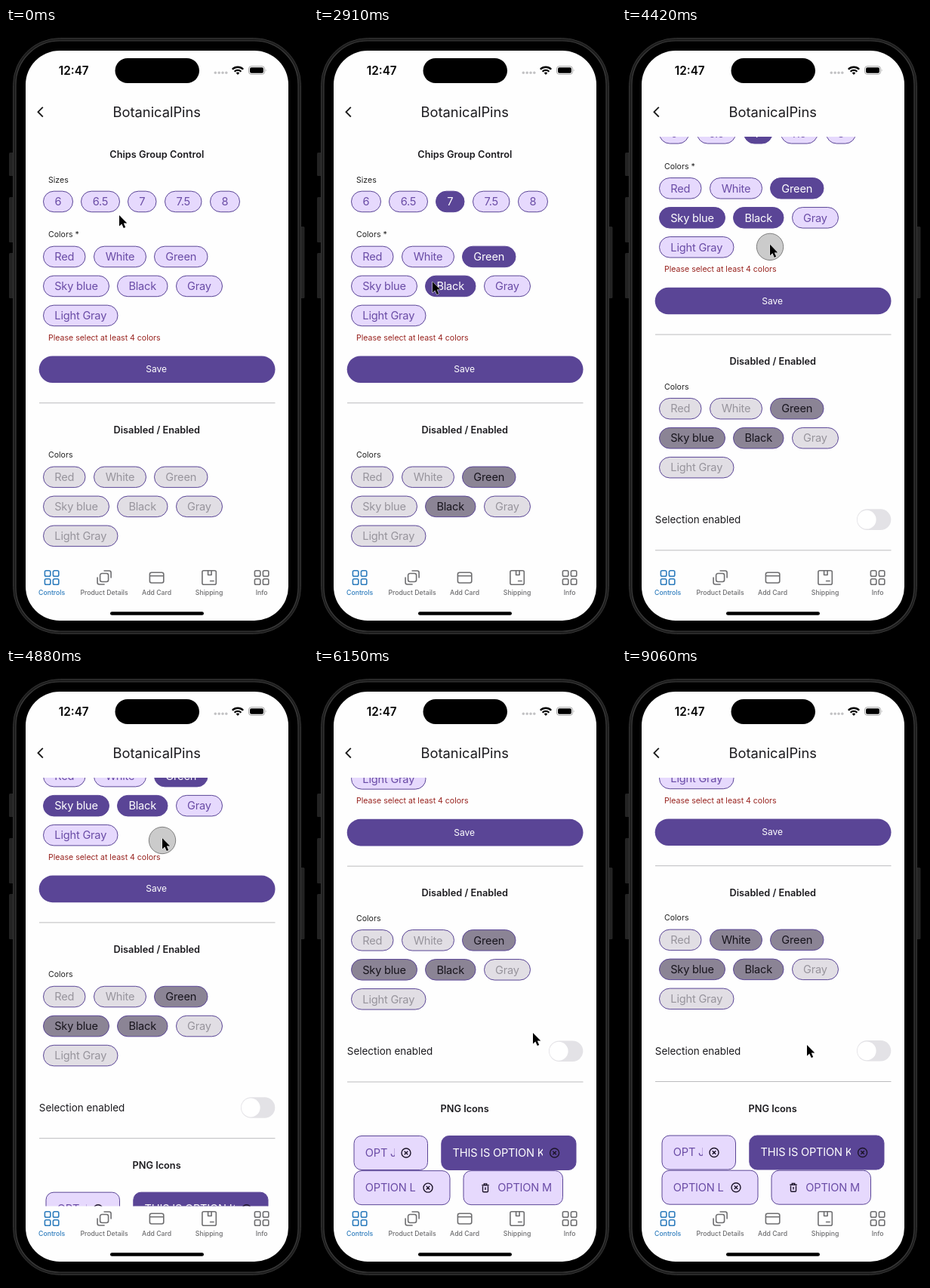
Write an HTML page that moves like this. It is 400x812 px and loops after 9.09 s.

```html
<!DOCTYPE html>
<html lang="en">
<head>
<meta charset="utf-8">
<title>Chips demo</title>
<style>
  html, body { margin: 0; width: 100%; height: 100%; overflow: hidden; background: #000; }
  svg { display: block; width: 400px; height: 812px; font-family: Inter, "Open Sans", sans-serif; }
  .mid { text-anchor: middle; }
  .chip { font-size: 14.6px; letter-spacing: -.2px; }
  .head { font-size: 12.75px; font-weight: 600; fill: #1c1b1f; }
  .small { font-size: 10.55px; fill: #222; }
  .tab { fill: none; stroke-width: 1.6; stroke-linecap: round; stroke-linejoin: round; }
  .tabname { font-size: 8.7px; font-weight: 500; }
</style>
</head>
<body>
<svg id="stage" viewBox="0 0 400 812" xmlns="http://www.w3.org/2000/svg">
  <defs>
    <clipPath id="view"><rect x="26" y="144" width="348" height="567.5"/></clipPath>
    <clipPath id="cutJ"><rect x="60" y="854" width="47" height="45"/></clipPath>
    <clipPath id="cutK"><rect x="175" y="854" width="128" height="45"/></clipPath>
  </defs>

  <!-- Phone body -->
  <rect width="400" height="812"/>
  <g fill="#232323">
    <rect x="4" y="165" width="7" height="31" rx="1.5"/>
    <rect x="4" y="224" width="7" height="60" rx="1.5"/>
    <rect x="4" y="298" width="7" height="60" rx="1.5"/>
    <rect x="389" y="263" width="6.5" height="95" rx="1.5"/>
  </g>
  <rect x="9.5" y="13.5" width="381" height="789" rx="62" fill="#1d1d1d" stroke="#353535"/>
  <rect x="13" y="17" width="374" height="782" rx="58" stroke="#3b3b3b" stroke-width="1.2"/>
  <rect x="26" y="30" width="348" height="755" rx="45" fill="#fefefe"/>
  <rect x="144.500" y="40" width="111.500" height="33" rx="16.500"/>

  <!-- Status bar -->
  <text x="89.700" y="61.700" class="mid" font-size="15.300" font-weight="600">12:47</text>
  <g fill="#c2c2c4">
    <circle cx="277.300" cy="59.300" r="1.700"/><circle cx="282.200" cy="59.300" r="1.700"/>
    <circle cx="287" cy="59.300" r="1.700"/><circle cx="291.800" cy="59.300" r="1.700"/>
  </g>
  <g fill="none" stroke="#000" stroke-width="2.300">
    <path d="M299.800 54.700a10.300 10.300 0 0 1 14.400 0"/>
    <path d="M302.600 57.700a6.300 6.300 0 0 1 8.800 0"/>
  </g>
  <path d="M304.700 59.500a3.300 3.300 0 0 1 4.600 0L307 62z"/>
  <rect x="321.500" y="50.700" width="21" height="10.600" rx="3.300" fill="none" stroke="#a5a5a5"/>
  <rect x="323" y="52.200" width="18" height="7.600" rx="2"/>
  <path d="M343.800 54.300q1.600 1.700 0 3.400z" fill="#a5a5a5"/>

  <!-- Title bar -->
  <path d="M48.800 104.800L42.500 111.200l6.300 6.400" fill="none" stroke="#1b1b1b" stroke-width="1.900"/>
  <text x="199.800" y="117.800" class="mid" font-size="18.300" fill="#1c1b1f">BotanicalPins</text>

  <g clip-path="url(#view)"><g id="page"></g></g>
  <g id="tabs"></g>
  <rect x="138" y="773.300" width="124" height="4.400" rx="2.200"/>

  <circle id="touch" r="17.700" fill="#999" fill-opacity=".5" stroke="#666" stroke-opacity=".8"/>
  <path id="cursor" d="M0 0v14.600l3.300-3.100 2.500 5.600 2.400-1.100-2.400-5.400h4.500z" stroke="#fff" stroke-width="1" paint-order="stroke" stroke-linejoin="round"/>
</svg>

<script>
const LOOP = 9090;
const PURPLE = '#5a4596', LILAC = '#e6d9fd', INK = '#6a4ca6';
const $ = id => document.getElementById(id);
const page = $('page');

function add(parent, tag, attrs, text) {
  const el = document.createElementNS('http://www.w3.org/2000/svg', tag);
  for (const k in attrs) el.setAttribute(k, attrs[k]);
  if (text) el.textContent = text;
  parent.append(el);
  return el;
}

const label = (cls, x, y, text, extra) => add(page, 'text', { class: cls, x, y, ...extra }, text);
const rule = y => add(page, 'path', { d: `M44 ${y}H356.500`, stroke: '#bcbcbe' });

function chip(name, x, y, right) {
  const box = add(page, 'rect', { x: x + .5, y: y + .5, width: right - x - 1, height: 27.5, rx: 13.75, stroke: PURPLE });
  const text = label('chip mid', (x + right) / 2, y + 19.5, name);
  return { name, box, text };
}

function paint({ box, text }, on, enabled = true) {
  const [fill, ink] = enabled
    ? (on ? [PURPLE, '#fff'] : [LILAC, INK])
    : (on ? ['#8b8495', '#17141c'] : ['#e1dee4', '#97949c']);
  box.setAttribute('fill', fill);
  text.setAttribute('fill', ink);
}

const colorChips = y => [
  chip('Red', 49, y, 105.5), chip('White', 116, y, 186), chip('Green', 196, y, 267.5),
  chip('Sky blue', 49, y + 39, 137), chip('Black', 147, y + 39, 214.5), chip('Gray', 225, y + 39, 287),
  chip('Light Gray', 49, y + 78, 148.5)
];

// Chips group
label('head mid', 199.8, 172.3, 'Chips Group Control');
label('small', 56, 204.5, 'Sizes');
const sizes = [['6', 49, 89], ['6.5', 99, 151], ['7', 161, 199.5], ['7.5', 210, 259.5], ['8', 270, 310]]
  .map(([name, x, right]) => chip(name, x, 215.7, right));
label('small', 56, 277.2, 'Colors *');
const colors = colorChips(288.7);
label('small', 56, 414, 'Please select at least 4 colors', { style: 'fill:#98231f' });
add(page, 'rect', { x: 43.7, y: 434.4, width: 312.8, height: 35.6, rx: 17.8, fill: PURPLE });
label('mid', 199.2, 456.3, 'Save', { 'font-size': 12, fill: '#fff' });
rule(496.7);

// Disabled / enabled group
label('head mid', 199.8, 537, 'Disabled / Enabled');
label('small', 56, 569.3, 'Colors');
const mirror = colorChips(580.6);
label('', 43.8, 746.8, 'Selection enabled', { 'font-size': 13.45, fill: '#1c1b1f' });
const track = add(page, 'rect', { x: 311, y: 728, width: 45.3, height: 27.6, rx: 13.8 });
const knob = add(page, 'circle', { cy: 741.8, r: 12.4, fill: '#fff' });
rule(782.5);

// Icon chips
label('head mid', 199.6, 822.5, 'PNG Icons');
function iconChip(x, y, right, text, tx, fill, ink, cut) {
  add(page, 'rect', { x: x + .5, y: y + .5, width: right - x - 1, height: 45, rx: 10, fill, stroke: PURPLE });
  label('chip', tx, y + 27.8, text, { fill: ink, ...(cut && { 'clip-path': `url(#${cut})` }) });
}
function closeIcon(x, y) {
  add(page, 'path', {
    d: `M${x - 6} ${y}a6 6 0 1 0 12 0a6 6 0 1 0 -12 0M${x - 2.3} ${y - 2.3}l4.6 4.6m0 -4.6l-4.6 4.6`,
    fill: 'none', stroke: '#1d1529', 'stroke-width': 1.4
  });
}
iconChip(52.5, 853.5, 151, 'OPT J', 67.8, LILAC, INK, 'cutJ');
iconChip(168.3, 853.5, 347.5, 'THIS IS OPTION K', 183.6, PURPLE, '#fff', 'cutK');
iconChip(52.5, 899.7, 180.5, 'OPTION L', 67.8, LILAC, INK);
iconChip(197.5, 899.7, 330, 'OPTION M', 243.3, LILAC, INK);
closeIcon(122, 876.5);
closeIcon(318.6, 876.5);
closeIcon(151, 922.7);
add(page, 'path', {
  d: 'M222.300 919.300h9.400M225.300 919v-1.600h3.400v1.600M223.500 920.500v6.500q0 1.300 1.300 1.300h4.400q1.300 0 1.300-1.300v-6.500M227 922v3.500',
  fill: 'none', stroke: '#1d1529', 'stroke-width': 1.4
});

// Tab bar, icons drawn around 0,0
const box = (x, y, w, h, r) =>
  `M${x + r} ${y}h${w - 2 * r}a${r} ${r} 0 0 1 ${r} ${r}v${h - 2 * r}a${r} ${r} 0 0 1 ${-r} ${r}` +
  `h${2 * r - w}a${r} ${r} 0 0 1 ${-r} ${-r}v${2 * r - h}a${r} ${r} 0 0 1 ${r} ${-r}z`;
const grid = [[-9.2, -9.2], [1.8, -9.2], [-9.2, 1.8], [1.8, 1.8]].map(([x, y]) => box(x, y, 7.4, 7.4, 1.8)).join('');
[
  ['Controls', grid],
  ['Product Details', box(-5.5, -5.5, 11, 11, 2.5) + 'M0 -9h6.500q2.500 0 2.500 2.500v6.500M-9 0v6.500q0 2.500 2.500 2.500h6.500'],
  ['Add Card', box(-9.2, -6.8, 18.4, 13.8, 2.4) + 'M-9 -2.300h18'],
  ['Shipping', box(-9.2, -9.2, 18.4, 18.4, 2) + 'M-1.500 -9v5.500h4.500v-5.500M1.500 4.500h4.500'],
  ['Info', grid]
].forEach(([name, d], i) => {
  const x = 60.6 + 69.5 * i, color = i ? '#6e6e70' : '#2d7cbd';
  add($('tabs'), 'path', { class: 'tab', d, stroke: color, transform: `translate(${x} 728)` });
  add($('tabs'), 'text', { class: 'tabname mid', x, y: 751, fill: color }, name);
});

// Pointer stops: time, x, y
const path = [
  [0, 150, 248], [250, 150, 248], [760, 178, 233], [1050, 179, 233], [1600, 229, 304], [1950, 229, 304],
  [2500, 160, 338], [2910, 157, 336], [3350, 110, 343], [3600, 110, 343], [3960, 190, 380], [4080, 191, 378],
  [4420, 196, 287], [4880, 207, 224], [5200, 209, 222], [5500, 214, 240], [6150, 290, 482], [6550, 332, 505],
  [6850, 332, 505], [7420, 162, 370], [7560, 157, 361], [7850, 157, 361], [8350, 330, 506], [8640, 330, 506],
  [9060, 245, 498], [LOOP, 245, 498]
];
const presses = [[830, 930], [1690, 1790], [2600, 2700], [3430, 3530], [4020, 4910], [6620, 6720], [7640, 7740], [8450, 8550]];
const picked = { 7: 930, Green: 1790, Black: 2700, 'Sky blue': 3530, White: 7740 };
const TOGGLE_ON = 6720, TOGGLE_OFF = 8550;

const clamp = v => Math.min(1, Math.max(0, v));
const ease = v => v * v * (3 - 2 * v);
const mix = (a, b, p) => a + (b - a) * p;

function pointer(t) {
  const i = Math.max(1, path.findIndex(p => p[0] > t));
  const [a, b] = [path[i - 1], path[i]];
  const p = (t - a[0]) / (b[0] - a[0]);
  const dragging = a[0] >= 4080 && b[0] <= 4880;
  const e = dragging ? p : ease(p);
  return [mix(a[1], b[1], e), mix(a[2], b[2], e)];
}

function scroll(t) {
  if (t < 4420) return 90.5 * clamp((t - 4080) / 340);
  if (t < 4880) return mix(90.5, 160.5, (t - 4420) / 460);
  return 236 - 75.5 * Math.exp((4880 - t) / 250);
}

function draw(t) {
  const [x, y] = pointer(t);
  $('cursor').setAttribute('transform', `translate(${x} ${y})`);
  $('touch').setAttribute('transform', `translate(${x} ${y + 3})`);
  $('touch').setAttribute('visibility', presses.some(([a, b]) => t >= a && t < b) ? 'visible' : 'hidden');
  page.setAttribute('transform', `translate(0 ${-scroll(t).toFixed(2)})`);

  const enabled = t >= TOGGLE_ON && t < TOGGLE_OFF;
  const isOn = c => t >= (picked[c.name] ?? Infinity);
  [...sizes, ...colors].forEach(c => paint(c, isOn(c)));
  mirror.forEach(c => paint(c, isOn(c), enabled));

  const on = ease(clamp((t - TOGGLE_ON) / 220)) - ease(clamp((t - TOGGLE_OFF) / 220));
  const shade = [[227, 60], [226, 190], [230, 82]].map(([a, b]) => Math.round(mix(a, b, on)));
  track.setAttribute('fill', `rgb(${shade})`);
  knob.setAttribute('cx', mix(324.2, 342.8, on));
}

const start = performance.now();
function tick() {
  draw((performance.now() - start) % LOOP);
  requestAnimationFrame(tick);
}
tick();
</script>
</body>
</html>
```
